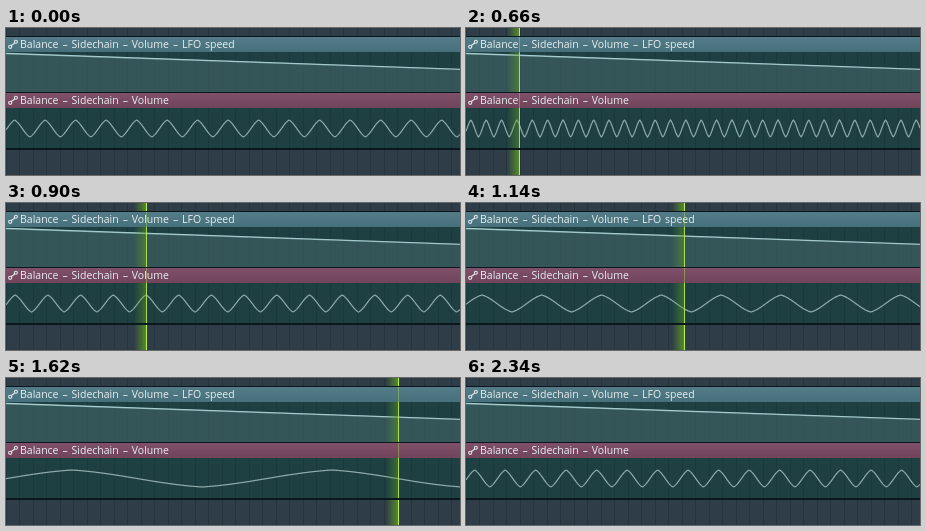
Animation of 454x147 px, one loop 2.58 s. Source, as an HTML page with a canvas:

```html
<!DOCTYPE html>
<html>
<head>
<meta charset="utf-8">
<style>
html, body { margin: 0; width: 100%; height: 100%; overflow: hidden; background: #2e3d48; }
canvas { display: block; }
</style>
</head>
<body>
<canvas id="stage" width="454" height="147"></canvas>
<script>
const W = 454, H = 147, LOOP = 2580, STEP = 60;
const SWEEP_START = 540, SWEEP_END = 1860, REST_PERIOD = 30.5;
const CLIPS = [9, 65], HEADER = 15, BODY = 40;
const ctx = document.getElementById('stage').getContext('2d');

// time, playhead x, wave period
const sweep = [
  [660, 53, 15.36], [900, 140, 32.7], [1140, 218, 59.8], [1380, 305, 129], [1620, 392, 260]
];

function sweepAt(t) {
  let i = 0;
  while (i < sweep.length - 2 && t > sweep[i + 1][0]) i++;
  const [t0, x0, p0] = sweep[i], [t1, x1, p1] = sweep[i + 1];
  const k = (t - t0) / (t1 - t0);
  return { x: Math.round(x0 + (x1 - x0) * k), period: p0 * Math.pow(p1 / p0, k) };
}

function rect(x, y, w, h, fill) {
  ctx.fillStyle = fill;
  ctx.fillRect(x, y, w, h);
}

function stroke(color, width) {
  ctx.strokeStyle = color;
  ctx.lineWidth = width;
  ctx.stroke();
}

function gridLines(y, h, color) {
  for (let x = 0; x < W; x += 13.5) rect(Math.floor(x), y, 1, h, color);
}

function linkIcon(y) {
  ctx.beginPath();
  ctx.arc(4.2, y + 9.8, 1.6, 0, 7);
  ctx.moveTo(5.4, y + 8.5);
  ctx.lineTo(8.7, y + 6);
  ctx.moveTo(11.4, y + 4.8);
  ctx.arc(9.9, y + 4.8, 1.5, 0, 7);
  stroke('#e2eaec', 1.1);
}

function clip(y, title, top, bottom) {
  rect(0, y - 1, W, HEADER + BODY + 3, '#0b171c');
  const shade = ctx.createLinearGradient(0, y, 0, y + HEADER);
  shade.addColorStop(0, top);
  shade.addColorStop(1, bottom);
  rect(0, y, W, HEADER, shade);
  rect(0, y + HEADER, W, BODY, '#1f4043');
  gridLines(y + HEADER, BODY, 'rgba(8,28,32,.18)');
  linkIcon(y);
  ctx.font = '10.5px "Open Sans", "Noto Sans", sans-serif';
  ctx.wordSpacing = '1.2px';
  ctx.fillStyle = '#e8eff1';
  ctx.fillText(title, 14, y + 11);
}

function ramp() {
  ctx.beginPath();
  ctx.moveTo(0, 25.5);
  ctx.lineTo(W, 41.3);
  stroke('#b4dade', 1.3);
  ctx.lineTo(W, 64);
  ctx.lineTo(0, 64);
  ctx.fillStyle = 'rgba(92,124,126,.36)';
  ctx.fill();
}

function wave(period) {
  ctx.beginPath();
  for (let x = 0; x <= W; x += 0.5) {
    const s = Math.sin(2 * Math.PI * (x - 1) / period);
    const value = 0.5 * s + Math.asin(s) / Math.PI;
    ctx.lineTo(x, 100.5 - 8.5 * value);
  }
  stroke('#8eabac', 1.2);
}

function playheadPart(x, y, h, glowAlpha, lineAlpha) {
  const glow = ctx.createLinearGradient(x - 12, 0, x, 0);
  glow.addColorStop(0, 'rgba(100,165,30,0)');
  glow.addColorStop(1, `rgba(100,165,30,${glowAlpha})`);
  rect(x - 12, y, 12, h, glow);
  rect(x, y, 1, h, `rgba(185,238,82,${lineAlpha})`);
}

// The glow shines fully on the empty grid and is veiled by the clips.
function playhead(x) {
  playheadPart(x, 0, 8, 0.75, 1);
  for (const y of CLIPS) {
    playheadPart(x, y, HEADER, 0, 0.4);
    playheadPart(x, y + HEADER, BODY, 0.45, 0.9);
  }
  playheadPart(x, 122, 25, 0.75, 1);
}

function draw(t) {
  const moving = t >= SWEEP_START && t < SWEEP_END;
  const state = moving ? sweepAt(t) : { period: REST_PERIOD };
  rect(0, 0, W, H, '#2e3d48');
  gridLines(0, H, '#26343d');
  clip(CLIPS[0], 'Balance – Sidechain – Volume – LFO speed', '#547c88', '#46707b');
  clip(CLIPS[1], 'Balance – Sidechain – Volume', '#80506a', '#70445a');
  ramp();
  wave(state.period);
  if (moving) playhead(state.x);
}

function tick() {
  const t = performance.now() % LOOP;
  draw(Math.floor(t / STEP) * STEP);
  requestAnimationFrame(tick);
}
tick();
</script>
</body>
</html>
```
